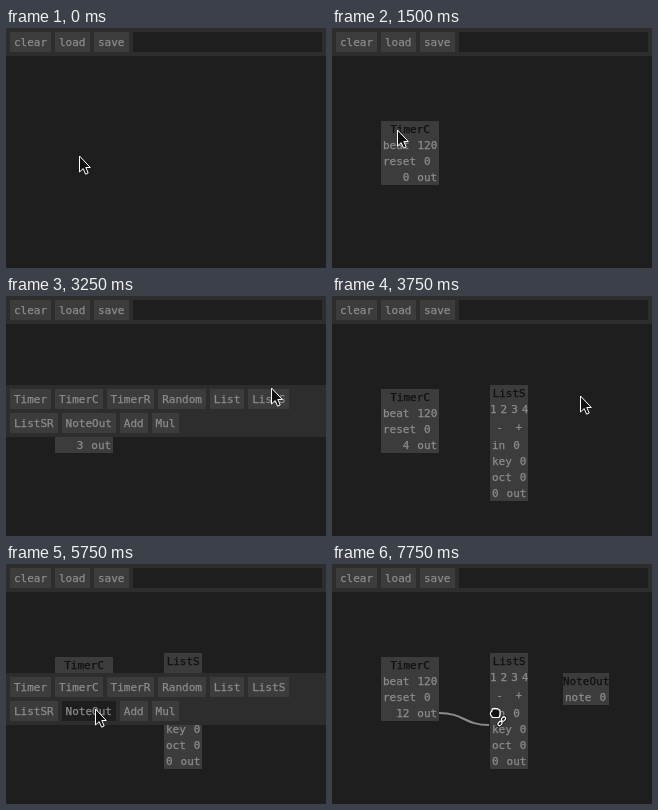
Animation of 320 by 240 pixels, one loop 8000 ms. Source, as an HTML page:

```html
<!DOCTYPE html>
<html lang="en">
<head>
<meta charset="utf-8">
<title>Node patcher</title>
<style>
  html, body { margin: 0; width: 100%; height: 100%; overflow: hidden; background: #1e1e1e; }
  svg { display: block; width: 100vw; height: 100vh; }
  text { font: 11px "DejaVu Sans Mono", "Noto Sans Mono", monospace; fill: #8c8c8c; stroke: #8c8c8c; stroke-width: .25; white-space: pre; }
  .title { fill: #111; stroke: #111; }
  .bar { fill: #2d2d2d; }
  .box { fill: #3c3c3c; }
  .field, .hover { fill: #1e1e1e; }
</style>
</head>
<body>
<svg id="stage" viewBox="0 0 320 240"></svg>
<script>
const LOOP = 8000, STEP = 250, CHAR = 6.6, ROW = 16, GAP = 4;
const stage = document.getElementById("stage");

function add(parent, tag, attrs = {}, content) {
  const el = document.createElementNS("http://www.w3.org/2000/svg", tag);
  for (const key in attrs) el.setAttribute(key, attrs[key]);
  if (content !== undefined) el.textContent = content;
  return parent.appendChild(el);
}
const group = () => add(stage, "g");
const show = (el, on) => el.setAttribute("display", on ? "inline" : "none");
const move = (el, x, y) => el.setAttribute("transform", `translate(${x} ${y})`);

// Edges snap to whole pixels, as layout boxes do.
function rect(parent, x, y, w, h, cls) {
  const left = Math.round(x);
  return add(parent, "rect", { x: left, y, width: Math.round(x + w) - left, height: h, class: cls });
}
function label(parent, x, y, content, anchor = "start", cls = "") {
  return add(parent, "text", { x, y, "text-anchor": anchor, class: cls }, content);
}
function button(parent, x, y, name, w = name.length * CHAR + 2 * GAP) {
  const el = rect(parent, x, y, w, 20, "box");
  label(parent, x + GAP, y + 14, name);
  return { el, x, y, w };
}

// Toolbar
const toolbar = group();
rect(toolbar, 0, 0, 320, 28, "bar");
let left = GAP;
for (const name of ["clear", "load", "save"]) {
  left += button(toolbar, left, GAP, name, Math.ceil(name.length * CHAR + 2 * GAP)).w + GAP;
}
rect(toolbar, left, GAP, 316 - left, 20, "field");

// Nodes
function node(x, y, w, h, title) {
  const g = group();
  move(g, x, y);
  rect(g, 0, 0, w, h, "box");
  label(g, w / 2, 12, title, "middle", "title");
  return g;
}
function input(g, y, name, value) {
  label(g, 2, y + 12, name);
  label(g, 10 + name.length * CHAR, y + 12, value);
}
function output(g, w, y, value) {
  label(g, w - 2, y + 12, "out", "end");
  return label(g, w - 10 - 3 * CHAR, y + 12, value, "end");
}

const wire = add(stage, "path", { fill: "none", stroke: "#8c8c8c", "stroke-width": 2 });

const timer = node(49, 93, 58.2, 64, "TimerC");
input(timer, ROW, "beat", "120");
input(timer, 2 * ROW, "reset", "0");
const count = output(timer, 58.2, 3 * ROW, "0");

const list = node(158, 89, 38.4, 116, "ListS");
for (let i = 0; i < 4; i++) label(list, CHAR / 2 + i * (CHAR + GAP), 28, i + 1, "middle");
label(list, 9.6, 46, "-", "middle");
label(list, 28.8, 46, "+", "middle");
["in", "key", "oct"].forEach((name, i) => input(list, 52 + i * ROW, name, "0"));
output(list, 38.4, 100, "0");

const note = node(231, 109, 46.2, 32, "NoteOut");
input(note, ROW, "note", "0");

// Menu
const menu = group();
rect(menu, 0, 0, 320, 52, "bar");
const items = [];
["Timer TimerC TimerR Random List ListS", "ListSR NoteOut Add Mul"].forEach((line, row) => {
  let x = GAP;
  for (const name of line.split(" ")) {
    const item = button(menu, x, GAP + row * 24, name);
    items.push(item);
    x += item.w + GAP;
  }
});

// Pointers
const arrow = group();
add(arrow, "path", {
  d: "M.5 1V17L4.2 13.6 6.6 19.2 9.2 18 6.8 12.5H11.3Z",
  fill: "#111", stroke: "#fff"
});
const hand = group();
add(hand, "path", {
  d: "M1.5 5.5 3 4V2.5Q4 1 5 2 6 .8 7.2 2 8.5 1 9.3 2.6 11 2.4 11 4.5V7.5L10 10.5H3.5L1.5 7.5Z",
  fill: "#111", stroke: "#fff", "stroke-width": 1.2
});
for (const [stroke, width] of [["#111", 3], ["#fff", 1.2]]) {
  const ring = { rx: 1.7, ry: 2.4, fill: "none", stroke, "stroke-width": width };
  add(hand, "ellipse", { ...ring, transform: "translate(14.5 12) rotate(40)" });
  add(hand, "ellipse", { ...ring, transform: "translate(11 16.5) rotate(40)" });
}

// Pointer gestures from one target to the next
const home = { x: 73, y: 127 };
const gestures = [
  { from: 0, to: 250, x: 48, y: 91 },
  { from: 750, to: 1500, x: 65, y: 101 },
  { from: 1500, to: 2250, x: 157, y: 87 },
  { from: 2500, to: 3250, x: 265, y: 91 },
  { from: 3250, to: 4250, x: 230, y: 107 },
  { from: 4500, to: 5250, x: 140, y: 155 },
  { from: 5250, to: 5750, x: 89, y: 144 },
  { from: 6250, to: 7000, x: 101, y: 147 },
  { from: 7000, to: 7500, x: 137, y: 175 },
  { from: 7500, to: 7750, x: 157, y: 143 }
];
const menus = [
  { from: 750, to: 1500, top: 93 },
  { from: 2500, to: 3750, top: 89 },
  { from: 4500, to: 6000, top: 109 }
];

function pointerAt(t) {
  let { x, y } = home;
  for (const g of gestures) {
    const p = Math.min(1, Math.max(0, (t - g.from) / (g.to - g.from)));
    const eased = p * p * (3 - 2 * p);
    x += (g.x - x) * eased;
    y += (g.y - y) * eased;
  }
  return { x: Math.round(x), y: Math.round(y) };
}

function render(time) {
  const t = Math.floor((time % LOOP) / STEP) * STEP;
  const { x, y } = pointerAt(t);
  const dragging = t >= 7000;

  show(timer, t >= menus[0].to);
  show(list, t >= menus[1].to);
  show(note, t >= menus[2].to);
  count.textContent = Math.max(0, Math.floor((t - 1400) / 510));

  const open = menus.find(m => t >= m.from && t < m.to);
  show(menu, open);
  if (open) {
    const px = x + 1, py = y + 2 - open.top;
    move(menu, 0, open.top);
    for (const b of items) {
      const over = px > b.x && px < b.x + b.w && py > b.y && py < b.y + 20;
      b.el.setAttribute("class", over ? "hover" : "box");
    }
  }

  show(wire, dragging);
  const endY = y + 18, mid = (107 + x) / 2;
  wire.setAttribute("d", `M107 149C${mid} 149 ${mid} ${endY} ${x} ${endY}`);

  show(arrow, !dragging);
  show(hand, dragging);
  move(dragging ? hand : arrow, x, y);
}

const start = performance.now();
function tick() {
  render(performance.now() - start);
  requestAnimationFrame(tick);
}
tick();
</script>
</body>
</html>
```
